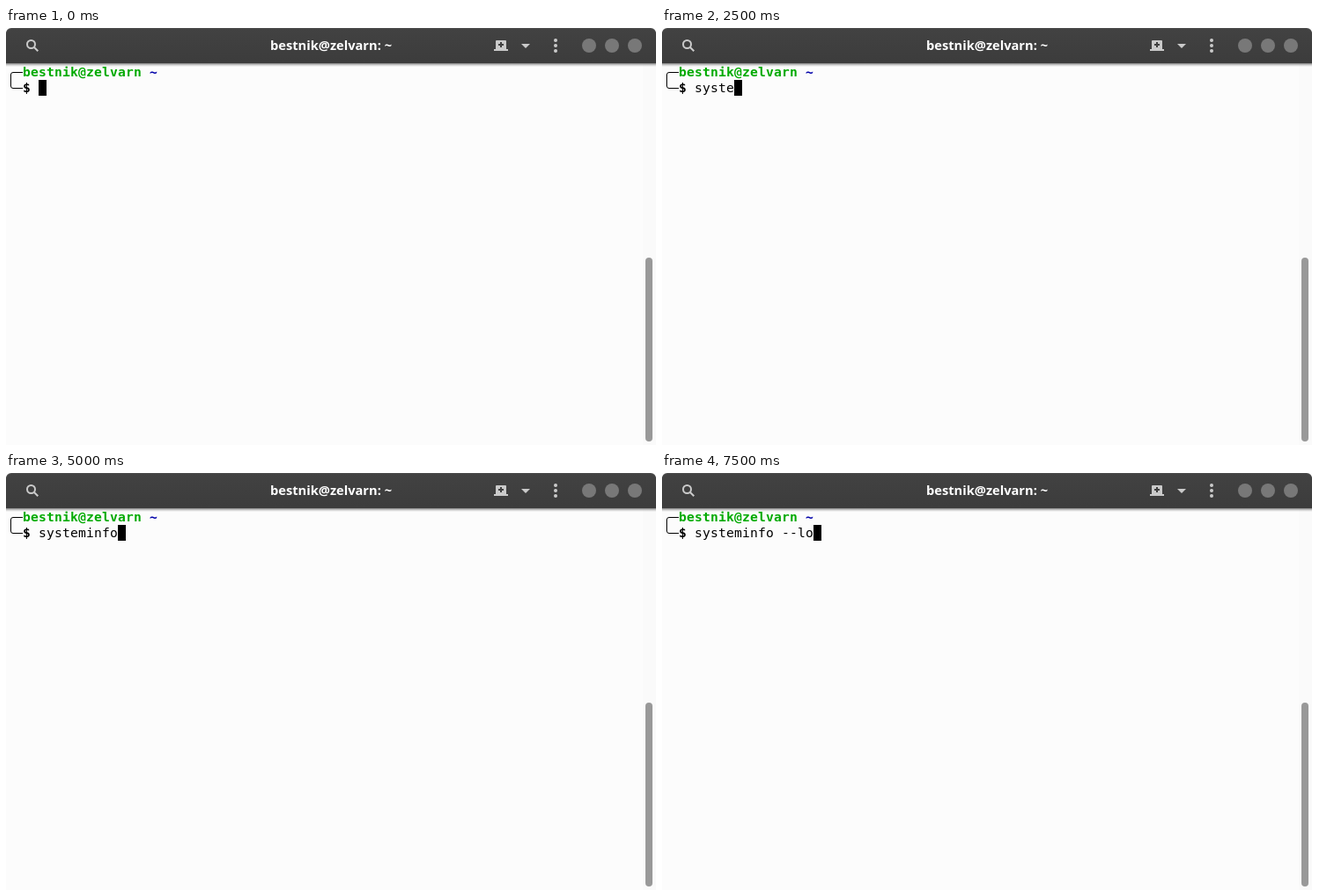
Recreate the animation shown at these times as an HTML page with a canvas. Size 738 by 474 pixels, loop 8 s.

```html
<!DOCTYPE html>
<html lang="en">
<head>
<meta charset="utf-8">
<title>Terminal</title>
<style>
  html, body { margin: 0; width: 100%; height: 100%; overflow: hidden; background: #fcfcfc; }
  canvas { display: block; width: 738px; height: 474px; }
</style>
</head>
<body>
<canvas id="stage" width="738" height="474"></canvas>
<script>
const ctx = document.getElementById('stage').getContext('2d');
const W = 738, H = 474, LOOP = 8000, KEY_MS = 500;
const CELL = 9, LINE = 18, LEFT = 1, TOP = 41;
const FONT_SIZE = '14.667px';
const HOST = 'bestnik@zelvarn';
const COMMAND = 'systeminfo --lo';
const ICON = '#cacaca';

function rect(x, y, w, h, color) {
  ctx.fillStyle = color;
  ctx.fillRect(x, y, w, h);
}

function disc(x, y, r, color) {
  ctx.fillStyle = color;
  ctx.beginPath();
  ctx.arc(x, y, r, 0, Math.PI * 2);
  ctx.fill();
}

function pill(x, y, w, h, r, color) {
  ctx.fillStyle = color;
  ctx.beginPath();
  ctx.roundRect(x, y, w, h, r);
  ctx.fill();
}

// Monospace text on the terminal grid, one glyph per cell
function print(str, col, row, color, weight = 'normal') {
  ctx.font = `${weight} ${FONT_SIZE} "DejaVu Sans Mono", monospace`;
  ctx.textAlign = 'left';
  ctx.fillStyle = color;
  [...str].forEach((ch, i) =>
    ctx.fillText(ch, LEFT + (col + i) * CELL, TOP + row * LINE + 14));
}

function drawHeader() {
  const shadow = ctx.createLinearGradient(0, 40, 0, 44);
  shadow.addColorStop(0, 'rgba(0,0,0,0.5)');
  shadow.addColorStop(0.5, 'rgba(0,0,0,0.18)');
  shadow.addColorStop(1, 'rgba(0,0,0,0)');
  rect(0, 40, W, 4, shadow);

  const bar = ctx.createLinearGradient(0, 0, 0, 40);
  bar.addColorStop(0, '#424242');
  bar.addColorStop(1, '#3c3c3c');
  pill(0, 0, W, 40, [6, 6, 0, 0], '#4c4c4c');
  pill(0, 1, W, 39, [6, 6, 0, 0], bar);

  ctx.font = `bold ${FONT_SIZE} "Noto Sans", "Open Sans", sans-serif`;
  ctx.textAlign = 'center';
  ctx.fillStyle = '#ffffff';
  ctx.fillText(HOST + ': ~', 369, 25);

  // Search
  ctx.strokeStyle = ICON;
  ctx.lineWidth = 2;
  ctx.beginPath();
  ctx.arc(28.5, 18.5, 4.5, 0, Math.PI * 2);
  ctx.moveTo(32, 22);
  ctx.lineTo(36.3, 26.3);
  ctx.stroke();

  // New tab
  pill(556, 14, 12, 10, [1, 1, 0, 0], ICON);
  rect(554, 24, 16, 2, ICON);
  rect(561, 16, 2, 6, '#404040');
  rect(559, 18, 6, 2, '#404040');

  // Drop-down
  ctx.fillStyle = ICON;
  ctx.beginPath();
  ctx.moveTo(585, 18);
  ctx.lineTo(595, 18);
  ctx.lineTo(590, 23);
  ctx.fill();

  for (const y of [14, 20, 26]) disc(624, y, 2, ICON);
  for (const x of [662, 688, 714]) disc(x, 20, 8, '#787878');
}

function drawPrompt() {
  ctx.strokeStyle = '#000000';
  ctx.lineWidth = 1;
  ctx.beginPath();
  ctx.moveTo(19, 50.5);
  ctx.arcTo(5.5, 50.5, 5.5, 59, 2.5);
  ctx.arcTo(5.5, 68.5, 19, 68.5, 2.5);
  ctx.lineTo(19, 68.5);
  ctx.stroke();
  print(HOST, 2, 0, '#00aa00', 'bold');
  print('~', 18, 0, '#0000aa', 'bold');
  print('$', 2, 1, '#000000', 'bold');
}

function draw(t) {
  rect(0, 0, W, H, '#fcfcfc');
  rect(723, 40, 15, H - 40, '#fafafa');
  pill(726, 261, 8, 209, 4, '#999999');
  drawHeader();
  drawPrompt();

  const typed = Math.floor(t / KEY_MS);
  print(COMMAND.slice(0, typed), 4, 1, '#000000');
  rect(LEFT + (4 + typed) * CELL, TOP + LINE, CELL, LINE, '#000000');
}

let start;
function tick(now) {
  start ??= now;
  draw((now - start) % LOOP);
  requestAnimationFrame(tick);
}
requestAnimationFrame(tick);
</script>
</body>
</html>
```
